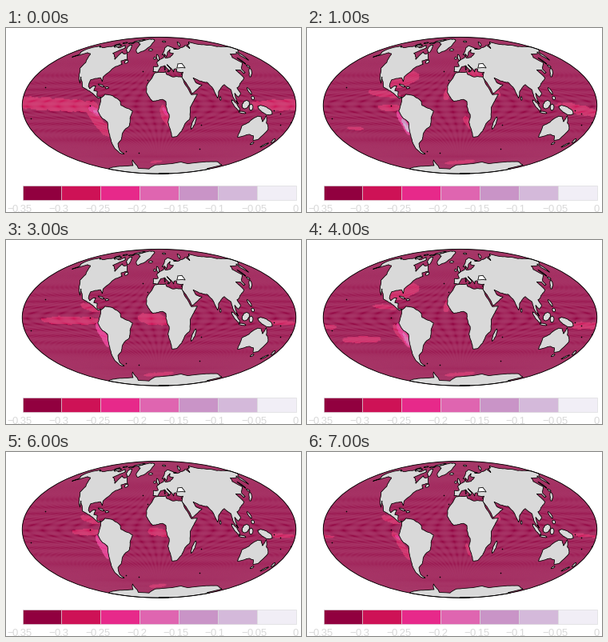
A matplotlib script that plays this animation: 369 px wide and 230 px high, repeating every 8000 ms.

```python
import numpy as np
import matplotlib.pyplot as plt
from matplotlib.animation import FuncAnimation
from matplotlib.collections import PolyCollection
from matplotlib.colors import to_rgba_array
from matplotlib.patches import Ellipse, Polygon, Rectangle

W, H, DPI = 369, 230, 64
PX = 72 / DPI
CX, CY, RX, RY = 191.5, 96.8, 171.2, 85.4
COLORS = ["#91003f", "#ce1256", "#e7298a", "#df65b0",
          "#c994c7", "#d4b9da", "#f1eef6"]
LAND = "#d9d9d9"
rng = np.random.default_rng(4)


def mollweide(lon, lat):
    lat = np.radians(np.asarray(lat, float))
    t = lat * 0.9
    for _ in range(40):
        slope = np.maximum(2 + 2 * np.cos(2 * t), 1e-6)
        t = np.clip(t - (2 * t + np.sin(2 * t) - np.pi * np.sin(lat)) / slope,
                    -np.pi / 2, np.pi / 2)
    return CX + RX * np.asarray(lon) / 180 * np.cos(t), CY - RY * np.sin(t)


plt.rcParams["font.family"] = "Liberation Sans"
fig = plt.figure(figsize=(W / DPI, H / DPI), dpi=DPI, facecolor="white")
ax = fig.add_axes([0, 0, 1, 1])
ax.set(xlim=(0, W), ylim=(H, 0))
ax.axis("off")

# One-degree cells; their antialiased seams give the fine texture
gx, gy = mollweide(*np.meshgrid(np.arange(-180, 181), np.arange(-90, 91)))
grid = np.stack([gx, gy], -1)
cells = np.stack([grid[:-1, :-1], grid[:-1, 1:], grid[1:, 1:], grid[1:, :-1]],
                 2).reshape(-1, 4, 2)
cx, cy = cells.mean(1).T


def blob(x0, y0, x1, y1, r):
    """Mask of a ragged streak from one point to another, half as wide as 2r."""
    dx, dy = (x1 - x0) / 2, (y1 - y0) / 2
    half = np.hypot(dx, dy)
    px, py = cx - x0 - dx, cy - y0 - dy
    u = (px * dx + py * dy) / half ** 2
    v = (py * dx - px * dy) / half / r
    rough = 0.16 * np.sin(cx * 0.31 + cy * 0.2) + 0.1 * np.sin(cx * 0.83 - cy * 0.5)
    return np.abs(u) ** 3 + v ** 2 < 1 + rough


def field(blobs):
    level = np.zeros(len(cx), int)
    for value, *shape in blobs:
        level = np.maximum(level, value * blob(*shape))
    return to_rgba_array(COLORS)[level]


# Raised classes: (class, x0, y0, x1, y1, half width)
peru = (2, 113, 103, 130, 134, 4)
coast_strip = (4, 119, 113, 128, 130, 2.5)
caribbean = (1, 103, 72, 142, 58, 7)
red_sea = (1, 224, 64, 242, 86, 3)
mexico = (1, 94, 81, 118, 88, 4)
senegal = (1, 180, 70, 173, 90, 4)
warm_pool = (1, 330, 107, 366, 107, 4.5)
ross_south = (1, 172, 169, 211, 166, 2)

step_a = [(1, 0, 92, 122, 99, 8), (1, 102, 100, 130, 135, 6),
          (2, 104, 99, 119, 108, 4), (3, 109, 103, 116, 106, 2),
          (1, 306, 97, 390, 95, 7), (1, 195, 96, 207, 125, 6),
          (2, 196, 99, 202, 109, 2), (1, 181, 168, 196, 166, 1.5)]
step_b = [(1, 77, 80, 118, 85, 4), (1, 88, 99, 120, 100, 4), caribbean, peru,
          coast_strip, (5, 121, 119, 128, 130, 1.3), (1, 50, 125, 71, 126, 2),
          senegal, (1, 194, 57, 224, 59, 4), red_sea,
          (1, 197, 111, 207, 126, 4), (1, 312, 96, 364, 107, 6), ross_south]
step_c = [(1, 14, 98, 124, 99, 7), (1, 72, 96, 118, 92, 5),
          (1, 98, 106, 127, 118, 5), (2, 60, 98, 114, 99, 3),
          (1, 25, 91, 43, 88, 2), (1, 160, 93, 206, 101, 9),
          (2, 174, 97, 202, 100, 4), (1, 306, 97, 368, 98, 5),
          (1, 130, 173, 158, 169, 4), (2, 133, 173, 148, 170, 2),
          (1, 180, 168, 197, 165, 2)]
step_d = [(1, 45, 100, 120, 101, 5), peru, mexico, (1, 166, 97, 204, 101, 7),
          (1, 318, 102, 362, 104, 3), ross_south]
step_e = [(1, 45, 125, 92, 124, 4), (1, 82, 82, 114, 85, 3), caribbean,
          (1, 107, 105, 130, 134, 4), peru, (3, 120, 115, 128, 131, 2),
          (1, 14, 108, 36, 109, 3), senegal, warm_pool, ross_south]
step_f = [(1, 64, 100, 121, 99, 5), (2, 88, 99, 116, 99, 2.5),
          (3, 112, 106, 126, 118, 3), (6, 114, 108, 122, 116, 2),
          (4, 121, 122, 130, 132, 3), (6, 123, 124, 129, 131, 1.8),
          (1, 132, 69, 152, 69, 1.5), mexico, (1, 156, 96, 206, 101, 9),
          (2, 168, 98, 202, 101, 5), red_sea, (1, 236, 84, 256, 76, 4),
          (1, 135, 172, 196, 175, 4), (1, 222, 167, 256, 168, 2)]
step_g = [(1, 84, 100, 120, 100, 4), peru, mexico, (1, 177, 98, 204, 102, 5),
          (1, 322, 104, 362, 105, 2.5), (1, 180, 168, 200, 166, 2)]
step_h = [mexico, (1, 106, 101, 119, 110, 4), (1, 112, 107, 130, 135, 4),
          (2, 110, 104, 118, 109, 2), (1, 10, 104, 34, 106, 1.8),
          (1, 314, 101, 366, 106, 2), (1, 199, 115, 206, 130, 3), red_sea]
fills = [field(s) for s in (step_a, step_b, step_c, step_d,
                            step_e, step_f, step_g, step_h)]

ax.add_patch(Ellipse((CX, CY), 2 * RX, 2 * RY, fc=COLORS[0], alpha=0.35, lw=0))
ocean = PolyCollection(cells, facecolors=fills[0], edgecolors="none",
                       linewidths=0, antialiaseds=True)
ocean.set_snap(False)
ax.add_collection(ocean, autolim=False)


def coast(pts, color=LAND, rough=0.07):
    """Draw a closed outline of (lon, lat) points with broken edges."""
    pts = np.array(pts, float)
    for _ in range(3):
        step = np.roll(pts, -1, 0) - pts
        shift = rng.uniform(-rough, rough, (len(pts), 1))
        mid = pts + step / 2 + step[:, ::-1] * [1, -1] * shift
        pts = np.stack([pts, mid], 1).reshape(-1, 2)
    lon, lat = np.clip(pts, [-180, -90], [180, 90]).T
    ax.add_patch(Polygon(np.column_stack(mollweide(lon, lat)), fc=color,
                         ec="black", lw=0.8 * PX, joinstyle="round"))


def island(lon, lat, w, h, tilt=0):
    a = np.linspace(0, 2 * np.pi, 8, endpoint=False)
    t = np.radians(tilt)
    x, y = w / 2 * np.cos(a), h / 2 * np.sin(a)
    coast(np.column_stack([lon + x * np.cos(t) - y * np.sin(t),
                           lat + x * np.sin(t) + y * np.cos(t)]))


# North America
coast([(-168, 66), (-166, 68.5), (-156, 71), (-128, 70), (-96, 68), (-94, 72),
       (-82, 68), (-94, 60), (-82, 55), (-79, 52), (-78, 62), (-69, 59),
       (-65, 60), (-56, 52), (-66, 50), (-61, 46), (-70, 43), (-76, 36),
       (-81, 31), (-80, 26), (-84, 30), (-97, 28), (-97, 21), (-94, 18),
       (-90, 21), (-87, 21), (-88, 16), (-83, 15), (-82, 9.5), (-77, 8.5),
       (-80, 7.5), (-92, 14.5), (-105, 20), (-113, 31), (-110, 24),
       (-118, 34), (-124, 41), (-124, 48), (-137, 59), (-148, 61),
       (-162, 55), (-158, 58.5), (-165, 62)])
# South America
coast([(-77, 8), (-72, 12), (-62, 10.5), (-51, 4), (-50, 0), (-35, -6),
       (-39, -14), (-41, -22), (-48, -26), (-57, -37), (-65, -42), (-69, -51),
       (-65, -55), (-72, -54), (-75, -48), (-73, -37), (-70, -18), (-76, -14),
       (-81, -6), (-77, 4)])
# Africa
coast([(-6, 35.8), (10, 37), (11, 34), (20, 31), (33, 31), (37, 21), (43, 11.5),
       (51, 12), (41, -2), (41, -15), (35, -20), (32, -28), (26, -34),
       (19, -34.5), (12, -18), (13.5, -10), (9, -1), (9, 4), (4, 6.5),
       (-8, 4.5), (-13, 9), (-17, 14), (-17, 21), (-10, 30)])
# Europe and Asia
europe = [(33, 31), (36, 36.5), (27, 37), (27, 40.5), (23, 40), (22, 36.7),
          (19, 41), (13, 45.5), (18, 40), (16, 38), (9, 44.3), (3, 43),
          (-2, 36.8), (-9, 37), (-9, 43), (-1.5, 43.5), (-4, 48.4), (8, 54),
          (10, 57.5), (11, 54), (20, 54.5), (29, 60), (22, 61), (25, 65.5),
          (17, 61), (14, 55.5), (11, 59), (6, 58), (14, 68), (25, 71)]
asia = [(41, 67), (34, 66.5), (44, 66), (60, 69), (73, 72), (73, 67), (80, 73),
        (104, 77.7), (113, 74), (140, 72.5), (180, 69), (180, 65.5), (163, 60),
        (157, 51), (156, 57), (163, 62), (142, 59), (135, 54.5), (140, 48),
        (128, 40), (129, 36), (126, 35), (125, 39), (118, 39), (122, 30),
        (110, 21), (106, 19), (109, 13), (105, 9), (101, 13), (104, 1.5),
        (98, 9), (97, 17), (90, 22.5), (80, 15), (77.5, 8), (72, 20), (67, 25),
        (57, 26.5), (49, 30), (51, 25), (59, 22), (44, 12.7), (34.7, 28)]
coast(europe + asia)
coast([(28, 41.5), (41, 41.5), (38, 47), (31, 46.5)], "white")
# Greenland
coast([(-73, 78), (-60, 82), (-35, 83.5), (-18, 80.5), (-24, 70), (-43, 60),
       (-52, 65), (-56, 74)])
# Antarctica
coast([(-180, -78), (-146, -75), (-102, -73), (-72, -72), (-58, -63.5),
       (-62, -73), (-70, -77), (-36, -78), (-10, -71), (32, -69), (52, -66.5),
       (72, -69), (110, -66), (135, -66), (168, -71), (164, -77), (180, -78),
       (180, -90), (-180, -90)], rough=0.01)
# Australia
coast([(114, -22), (122, -18), (131, -11.5), (136, -12), (140, -17.5),
       (142.5, -11), (146, -19), (153, -26), (150, -37.5), (144, -38.5),
       (138, -33), (131, -31.5), (116, -34.5)])

# Larger islands: centre, size, tilt
island(-72, 67, 20, 6, -32)
island(-110, 71, 14, 4)
island(-120, 73, 8, 3)
island(-88, 75.5, 16, 2)
island(-78, 79.8, 24, 5, 8)
island(-110, 76, 12, 2)
island(-19, 65, 9, 3)
island(-2.5, 54.5, 9, 4, 115)
island(-8, 53.5, 4, 3)
island(18, 78.5, 12, 3)
island(59, 74, 16, 3, 28)
island(47, -19, 14, 4, 72)
island(140, -5, 22, 7, -22)
island(114, 1, 11, 8, 35)
island(101, 0, 16, 4, -47)
island(110, -7.5, 10, 2, -8)
island(121, -2, 5, 7)
island(121.5, 15.5, 8, 3, -65)
island(124, 8, 4, 4)
island(137, 36, 15, 3, 42)
island(143, 43.5, 4, 3)
island(143, 50, 2, 8)
island(147, -42, 4, 3)
island(175.5, -39, 6, 3, -50)
island(170, -44, 7, 3, 42)
island(81, 7.5, 2, 4)
island(-79.5, 21.5, 10, 1.5, -18)
island(-71, 19, 5, 2)
island(-56, 49, 6, 4)
island(9, 41, 1.3, 4)
island(14, 37.5, 3, 1.3)

specks = np.array([(-155, 19.6), (-91, -0.5), (-172, -13.5), (178, -17.8),
                   (166, -21), (160, -9), (151, -5), (57, -20.5), (69, -49),
                   (-37, -54), (-59, -52), (-25, 38), (-16, 28), (33, 35)])
ax.plot(*mollweide(*specks.T), "o", ms=1.6 * PX, color="black", mew=0)
ax.add_patch(Ellipse((CX, CY), 2 * RX, 2 * RY, fill=False, ec="black", lw=0.9 * PX))

# Colour key
edges = np.linspace(20.5, 362.5, 8)
for x, c in zip(edges, COLORS):
    ax.add_patch(Rectangle((x, 196.5), edges[1] - edges[0], 18, fc=c, ec=LAND,
                           lw=0.6 * PX))
for i, x in enumerate(edges):
    label = "0" if i == 7 else f"{0.35 - 0.05 * i:.2f}".rstrip("0")
    style = dict(color=LAND, fontsize=13 * PX, va="baseline")
    ax.text(x, 230, label, ha="center", **style)
    if i < 7:
        ax.text(x - (11.5 if len(label) > 3 else 8.5), 230, "\u2212", ha="right", **style)


def update(k):
    ocean.set_facecolor(fills[k])
    return [ocean]


anim = FuncAnimation(fig, update, frames=len(fills), interval=1000, repeat=True,
                     blit=False)
plt.show()
```
